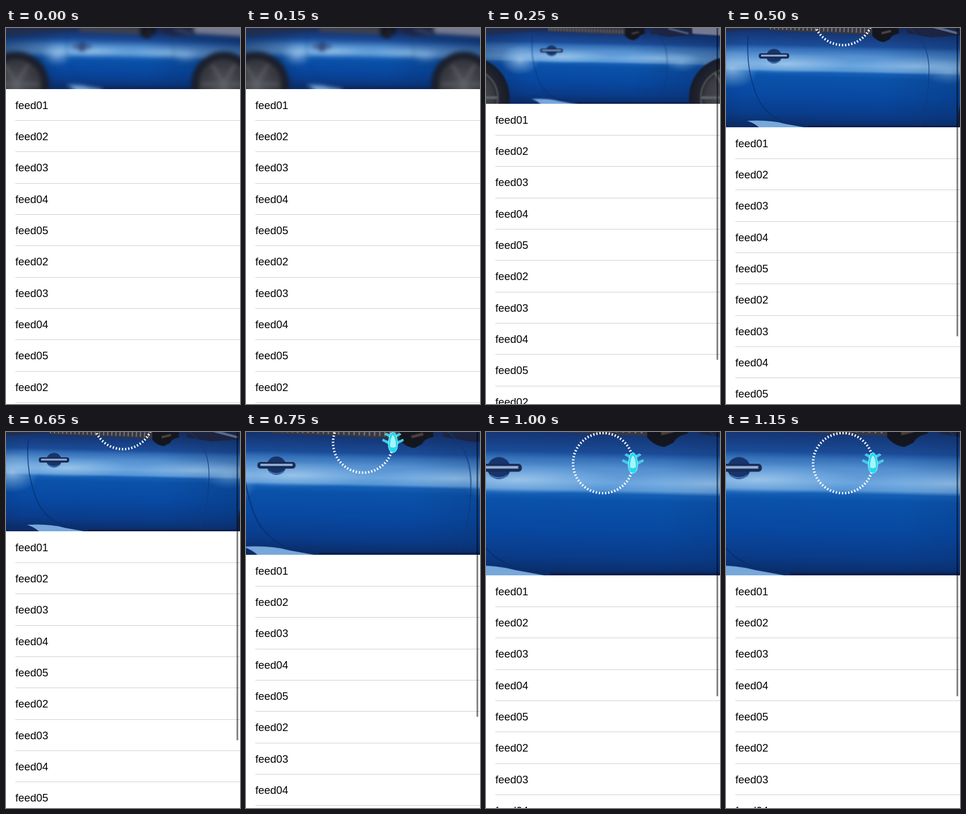
These frames come from a looping animation (400x640 px, 1250 ms). An HTML page:

```html
<!DOCTYPE html>
<html lang="en">
<head>
<meta charset="utf-8">
<title>Pull to refresh feed</title>
<style>
  html, body { margin: 0; width: 100%; height: 100%; overflow: hidden; background: #fff; }
  .stage { position: relative; width: 400px; height: 640px; overflow: hidden; }
  .scroll, .car, .ring, .bar { position: absolute; }
  .scroll, .car, .bar { animation: 1250ms step-end infinite; }
  svg { width: 1px; height: 1px; overflow: visible; }

  .scroll { left: 0; top: 0; width: 400px; animation-name: pull; }
  .car { left: 200px; top: 0; transform-origin: 0 0; animation-name: zoom; }
  .ring { left: 200px; top: -191px; }
  .bar {
    left: 394px; top: -100px; width: 3px; height: 794px;
    border-radius: 2px; background: rgba(0, 0, 0, .47); animation-name: bar;
  }

  ul {
    position: relative; margin: 0; padding: .7px 0 0 16px; min-height: 640px;
    list-style: none; background: #fff; color: #000;
    font: 18.4px/53px "Liberation Sans", Arial, sans-serif;
  }
  li { height: 53.33px; box-sizing: border-box; border-bottom: 1px solid #d2d2d5; }

  @keyframes pull {
    0% { transform: translateY(104px); }
    20% { transform: translateY(129px); }
    40% { transform: translateY(169px); }
    60% { transform: translateY(209px); }
    80%, 100% { transform: translateY(244px); }
  }
  @keyframes zoom {
    0% { transform: scale(.593); filter: blur(6px); }
    20% { transform: scale(.746); filter: blur(1.4px); }
    40% { transform: scale(1); filter: blur(.7px); }
    60% { transform: scale(1.254); filter: blur(.5px); }
    80%, 100% { transform: scale(1.508); filter: blur(.4px); }
  }
  @keyframes bar {
    0% { transform: none; visibility: hidden; }
    20% { transform: translateY(-129px); visibility: visible; }
    40% { transform: translateY(-169px); visibility: visible; }
    60% { transform: translateY(-209px); visibility: visible; }
    80%, 100% { transform: translateY(-244px); visibility: visible; }
  }
</style>
</head>
<body>
<div class="stage">
  <div class="scroll">
    <svg class="car">
      <defs>
        <linearGradient id="paint" gradientUnits="userSpaceOnUse" x1="0" y1="-175" x2="0" y2="0" gradientTransform="rotate(1.2)">
          <stop offset="0" stop-color="#17264f"/>
          <stop offset=".1" stop-color="#153878"/>
          <stop offset=".21" stop-color="#1b4c98"/>
          <stop offset=".25" stop-color="#3570b8"/>
          <stop offset=".31" stop-color="#5590d0"/>
          <stop offset=".4" stop-color="#6aa5de"/>
          <stop offset=".45" stop-color="#5896d6"/>
          <stop offset=".475" stop-color="#1560b6"/>
          <stop offset=".52" stop-color="#0b52aa"/>
          <stop offset=".7" stop-color="#0849a2"/>
          <stop offset=".88" stop-color="#0a3c8a"/>
          <stop offset="1" stop-color="#0b2c66"/>
        </linearGradient>
        <linearGradient id="shade" gradientUnits="userSpaceOnUse" x1="-340" x2="340" y1="0" y2="0">
          <stop offset="0" stop-color="#0a2350" stop-opacity=".6"/>
          <stop offset=".16" stop-color="#0a2350" stop-opacity=".25"/>
          <stop offset=".25" stop-color="#0a2350" stop-opacity="0"/>
          <stop offset=".6" stop-color="#0a2350" stop-opacity="0"/>
          <stop offset="1" stop-color="#0a2350" stop-opacity=".5"/>
        </linearGradient>
        <radialGradient id="glow">
          <stop offset="0" stop-color="#a9cdec" stop-opacity=".75"/>
          <stop offset="1" stop-color="#8fbde8" stop-opacity="0"/>
        </radialGradient>
        <radialGradient id="tyre">
          <stop offset="0" stop-color="#55565c"/>
          <stop offset=".6" stop-color="#3a3b42"/>
          <stop offset=".72" stop-color="#24262e"/>
          <stop offset="1" stop-color="#161b2a"/>
        </radialGradient>
        <g id="wheel">
          <circle r="93" fill="url(#tyre)"/>
          <circle r="66" fill="none" stroke="#5b5d64" stroke-width="3"/>
          <path d="M-64 0H64M-32-55 32 55M-32 55 32-55" stroke="#62646b" stroke-width="6"/>
        </g>
      </defs>

      <path d="M-400-240H400V60H-400Z" fill="url(#paint)"/>
      <path d="M-400-240H400V60H-400Z" fill="url(#shade)"/>
      <ellipse cx="-190" cy="-100" rx="46" ry="34" fill="url(#glow)"/>
      <ellipse cx="-95" cy="-108" rx="110" ry="17" fill="url(#glow)"/>
      <ellipse cx="125" cy="-104" rx="110" ry="15" fill="url(#glow)" opacity=".7"/>
      <ellipse cx="180" cy="-94" rx="42" ry="22" fill="url(#glow)" opacity=".5"/>

      <!-- windows and mirror -->
      <path d="M-400-240H-130V-168L-180-164-400-150Z" fill="#222d4c"/>
      <path d="M-128-240H56V-157L-125-165Z" fill="#363741"/>
      <path d="M-125-171 50-164" stroke="#74747f" stroke-width="8" stroke-dasharray="2 5"/>
      <path d="M92-240H210V-157L150-153 110-160Z" fill="#1c2440"/>
      <path d="M150-172 196-160" stroke="#56688c" stroke-width="4"/>
      <path d="M200-240H400V-148L205-160Z" fill="#777a8e"/>
      <path d="M50-200H92L96-160Q84-158 80-150L70-145Q58-146 50-156Z" fill="#14161f"/>
      <path d="M66-160 82-164" stroke="#4a3f3c" stroke-width="4"/>

      <!-- door -->
      <path d="M-162-156Q-166-106-152-66Q-140-24-100-9Q-80-5-40-4H125" fill="none" stroke="#0b2f6c" stroke-width="1.600" opacity=".8"/>
      <path d="M108-172Q146-150 147-100Q147-45 132-6" fill="none" stroke="#123a78" stroke-width="1.400" opacity=".8"/>
      <path d="M-164-11Q-125-13-100-6L-50 3V20H-130Q-140-4-164-11Z" fill="#78a8da"/>
      <path d="M-60-3H210V20H-60Z" fill="#0a1f4c"/>

      <!-- handle -->
      <ellipse cx="-118" cy="-121" rx="13" ry="12.500" fill="#17356c"/>
      <rect x="-144" y="-126" width="52" height="9" rx="4" fill="#1a2a52"/>
      <path d="M-140-122H-96" stroke="#8fb0da" stroke-width="3"/>
      <path d="M-128-113Q-118-107-108-113" fill="none" stroke="#3f70b0" stroke-width="2"/>

      <use href="#wheel" x="-307" y="-14"/>
      <use href="#wheel" x="290" y="-14"/>
    </svg>

    <svg class="ring">
      <circle r="51.200" fill="none" stroke="#fff" stroke-width="4.270" stroke-dasharray="2.133 3.200"/>
      <g transform="translate(51.200 0)" fill="#1fcfe8" stroke="#7fe9f5" stroke-width=".8">
        <path d="M-6 3-18-3-17-6-6-1ZM6 3 18-3 17-6 6-1Z"/>
        <path d="M-4-8-14-14-11-16-3-12ZM4-8 14-14 11-16 3-12Z"/>
        <path d="M0-18C4-18 8-8 8 3C8 11 5 17 0 17C-5 17-8 11-8 3C-8-8-4-18 0-18Z" fill="#1fdcf0" stroke="#c9f8ff"/>
        <path d="M0-13C3-10 5-4 5 7Q0 10-5 7C-5-4-3-10 0-13Z" fill="#a8f3fa" stroke="none"/>
      </g>
    </svg>

    <ul>
      <li>feed01</li>
      <li>feed02</li>
      <li>feed03</li>
      <li>feed04</li>
      <li>feed05</li>
      <li>feed02</li>
      <li>feed03</li>
      <li>feed04</li>
      <li>feed05</li>
      <li>feed02</li>
    </ul>
  </div>
  <div class="bar"></div>
</div>
</body>
</html>
```
